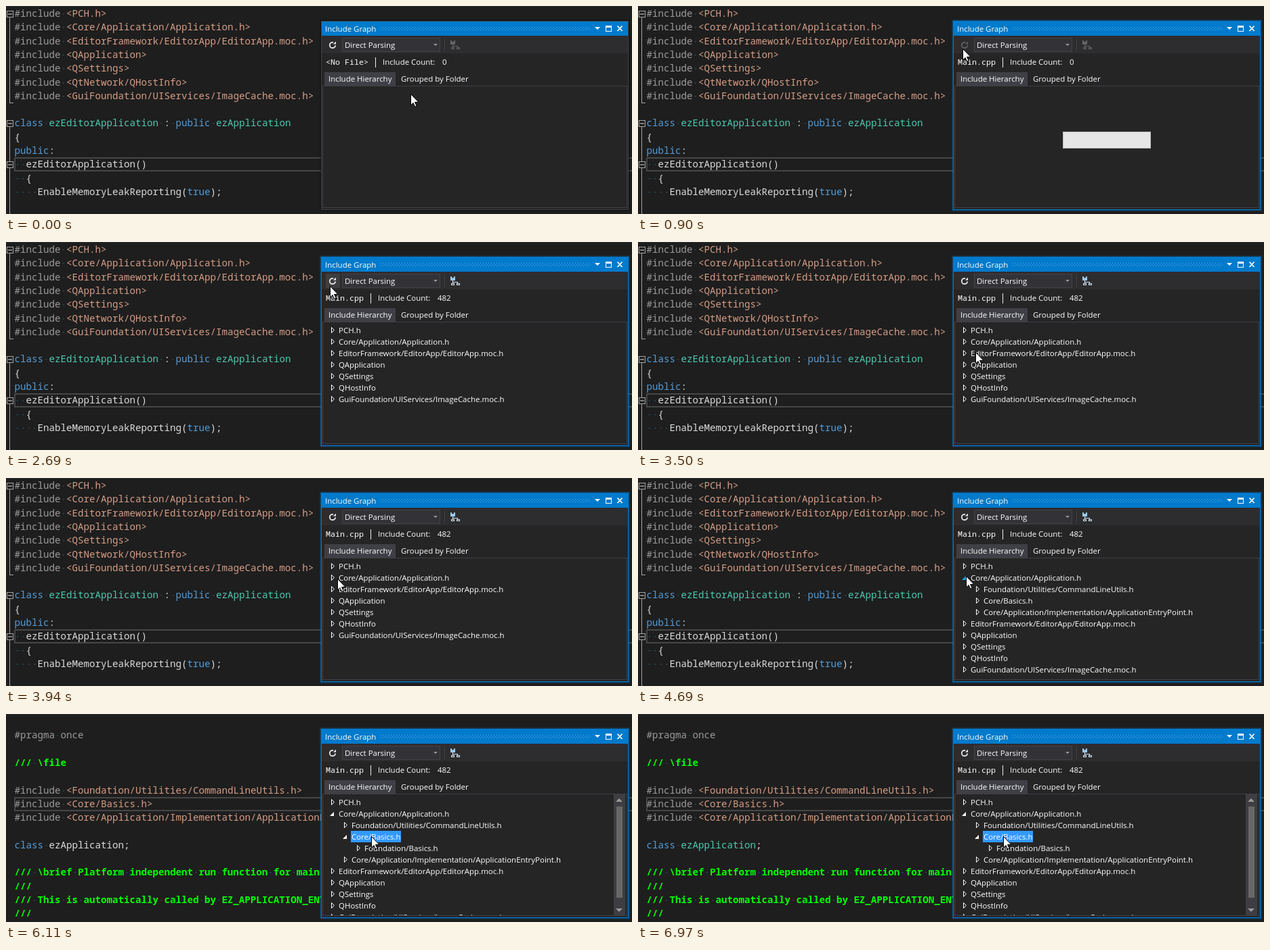
Recreate the animation shown at these times as an HTML page with a canvas. Size 924 px wide and 308 px high, loop 7200 ms.

```html
<!DOCTYPE html>
<html lang="en">
<head>
<meta charset="utf-8">
<title>Include Graph</title>
<style>
html, body { margin: 0; width: 100%; height: 100%; overflow: hidden; background: #1e1e1e; }
canvas { display: block; }
</style>
</head>
<body>
<canvas id="stage" width="924" height="308"></canvas>
<script>
const g = document.getElementById('stage').getContext('2d', { alpha: false });
const LOOP = 7200;
const UI = '11.48px "Open Sans", "Noto Sans", sans-serif';
const CODE = '14.17px "Noto Sans Mono", "DejaVu Sans Mono", monospace';
const SMALL = '11.67px "Noto Sans Mono", "DejaVu Sans Mono", monospace';
const LEFT = 12.6, CHAR = 8.5, LINE = 20.3;

const mainFile = `#include <PCH.h>
#include <Core/Application/Application.h>
#include <EditorFramework/EditorApp/EditorApp.moc.h>
#include <QApplication>
#include <QSettings>
#include <QtNetwork/QHostInfo>
#include <GuiFoundation/UIServices/ImageCache.moc.h>

class ezEditorApplication : public ezApplication
{
public:
  ezEditorApplication()
  {
    EnableMemoryLeakReporting(true);`.split('\n');

const headerFile = String.raw`
#pragma once

/// \file

#include <Foundation/Utilities/CommandLineUtils.h>
#include <Core/Basics.h>
#include <Core/Application/Implementation/ApplicationEntryPoint.h>

class ezApplication;

/// \brief Platform independent run function for main loop
///
/// This is automatically called by EZ_APPLICATION_ENTRY_POINT
///`.split('\n');

// Cursor moves: start, end, steps, control point, end point
const start = [598, 130];
const moves = [
  [80, 600, 8, 530, 35, 480, 63],
  [1110, 1110, 1, 480, 63, 479, 62],
  [2690, 3270, 9, 480, 110, 499, 162],
  [3500, 3500, 1, 499, 163, 499, 163],
  [3660, 4020, 6, 494, 152, 487, 145],
  [4160, 4160, 1, 485, 145, 485, 145],
  [4550, 4550, 1, 484, 144, 484, 144],
  [4690, 4690, 1, 485, 145, 485, 145],
  [4763, 4910, 3, 505, 165, 532, 185],
  [5220, 5440, 4, 536, 182, 540, 181]
];

// Steps done by time t out of n spread evenly from a to b
const stepsDone = (t, a, b, n) =>
  t < a ? 0 : t >= b ? n : 1 + Math.floor((t - a) / (b - a) * (n - 1));

function cursorAt(t) {
  let [x, y] = start;
  for (const [a, b, n, cx, cy, ex, ey] of moves) {
    const k = stepsDone(t, a, b, n) / n, u = k * k * (3 - 2 * k), v = 1 - u;
    x = v * v * x + 2 * u * v * cx + u * u * ex;
    y = v * v * y + 2 * u * v * cy + u * u * ey;
  }
  return [Math.round(x), Math.round(y)];
}

function rect(x, y, w, h, color) {
  g.fillStyle = color;
  g.fillRect(x, y, w, h);
}

function frame(x, y, w, h, color) {
  g.strokeStyle = color;
  g.lineWidth = 1;
  g.strokeRect(x + .5, y + .5, w - 1, h - 1);
}

function text(s, x, y, color = '#fff', font = UI) {
  g.font = font;
  g.fillStyle = color;
  g.fillText(s, x, y);
}

function shape(points, fill, stroke) {
  g.beginPath();
  for (let i = 0; i < points.length; i += 2) g.lineTo(points[i], points[i + 1]);
  g.closePath();
  if (fill) { g.fillStyle = fill; g.fill(); }
  if (stroke) { g.strokeStyle = stroke; g.lineWidth = 1; g.stroke(); }
}

// Groups: comment, directive, path, keyword, type; anything else is plain
const token = /(\/\/\/.*)|(#\w+|\bonce\b)|(<.*>)|\b(class|public|true)\b|(ezEditorApplication(?= )|ezApplication)|\w+|[^\s\w]/g;
const tokenColors = ['#00ff00', '#9b9b9b', '#d69d85', '#569cd6', '#4ec9b0'];

function codeLine(s, y, typesKnown) {
  for (const m of s.matchAll(token)) {
    const kind = m.slice(1).findIndex(Boolean);
    const plain = kind < 0 || kind === 4 && !typesKnown;
    const font = kind === 0 ? 'bold ' + CODE : CODE;
    text(m[0], LEFT + m.index * CHAR, y, plain ? '#dcdcdc' : tokenColors[kind], font);
  }
  [...s].forEach((c, i) => {
    if (c === ' ') rect(LEFT + i * CHAR + 3.5, y - 5, 1.5, 1.5, '#2a5a66');
  });
}

function foldBox(y) {
  rect(1, y, 10, 10, '#1e1e1e');
  frame(1, y, 10, 10, '#a5a5a5');
  rect(3, y + 4.5, 6, 1, '#e0e0e0');
}

function editor(t) {
  const opened = t >= 5970;
  rect(0, 0, 924, 308, '#1e1e1e');
  rect(0, 0, 924, 1, '#2d2d30');
  const rowY = opened ? 123 : 224;
  rect(12, rowY, 920, 21, '#464646');
  rect(14, rowY + 2, 920, 17, '#1e1e1e');
  (opened ? headerFile : mainFile).forEach((s, i) =>
    codeLine(s, Math.round(16 + LINE * i), !opened || t >= 6970));
  if (opened) return;
  rect(5, 12, 1, 132, '#a5a5a5');
  rect(5, 143, 6, 1, '#a5a5a5');
  rect(5, 174, 1, 134, '#a5a5a5');
  [7, 169, 230].forEach(foldBox);
}

function refreshIcon(color) {
  g.strokeStyle = color;
  g.lineWidth = 1.7;
  g.beginPath();
  g.arc(482, 58, 4.2, .1, 5);
  g.stroke();
  shape([483, 56.5, 487, 56.5, 487, 52.5], color);
}

function saveIcon(disk, nodes) {
  rect(656, 51, 7, 6, disk);
  rect(658, 51, 3, 2, '#2d2d30');
  rect(659, 57, 1, 5, nodes);
  rect(659, 59, 8, 1, nodes);
  rect(666, 59, 1, 3, nodes);
  frame(657, 61, 5, 3, nodes);
  frame(665, 61, 5, 3, nodes);
}

function titleBar() {
  rect(466, 23, 452, 21, '#007acc');
  text('Include Graph', 471, 38);
  for (let x = 552; x < 862; x += 4) {
    rect(x, 31, 1, 1, '#59a8de');
    rect(x + 2, 33, 1, 1, '#59a8de');
    rect(x, 35, 1, 1, '#59a8de');
  }
  shape([869, 31, 877, 31, 873, 35], '#fff');
  frame(885, 29, 9, 9, '#fff');
  rect(885, 29, 9, 3, '#fff');
  g.lineWidth = 1.7;
  g.strokeStyle = '#fff';
  g.beginPath();
  g.moveTo(902.5, 29.5); g.lineTo(909.5, 37);
  g.moveTo(909.5, 29.5); g.lineTo(902.5, 37);
  g.stroke();
}

function treeRows(t) {
  const open = t >= 4690, inner = t >= 5890;
  return [
    [0, 'PCH.h'],
    [0, 'Core/Application/Application.h', open],
    ...(open ? [
      [1, 'Foundation/Utilities/CommandLineUtils.h'],
      [1, 'Core/Basics.h', inner],
      ...(inner ? [[2, 'Foundation/Basics.h']] : []),
      [1, 'Core/Application/Implementation/ApplicationEntryPoint.h']
    ] : []),
    [0, 'EditorFramework/EditorApp/EditorApp.moc.h'],
    [0, 'QApplication'],
    [0, 'QSettings'],
    [0, 'QHostInfo'],
    [0, 'GuiFoundation/UIServices/ImageCache.moc.h']
  ];
}

function tree(t, [mx, my]) {
  g.save();
  g.beginPath();
  g.rect(468, 119, 448, 179);
  g.clip();
  treeRows(t).forEach(([depth, name, open], i) => {
    const x = 480 + 19 * depth, y = 131 + 17 * i;
    const hover = mx >= x - 3 && mx < x + 9 && Math.abs(my - y) < 8;
    const color = hover ? '#1ba1e2' : '#fff';
    if (open) shape([x - 2, y + 3, x + 4, y + 3, x + 4, y - 3], color);
    else shape([x + .5, y - 4.5, x + 4.5, y - .5, x + .5, y + 3.5], null, color);
    if (name === 'Core/Basics.h' && t >= 5830) rect(509, y - 9, 74, 17, '#3399ff');
    text(name, x + 11, y + 4);
  });
  g.restore();
  if (t >= 5890) {
    rect(897, 119, 17, 179, '#3e3e42');
    rect(901, 137, 9, 135, '#686868');
    shape([900, 130, 910, 130, 905, 125], '#999');
    shape([900, 288, 910, 288, 905, 293], '#999');
  }
}

function progress(t) {
  rect(627, 186, 130, 25, '#bcbcbc');
  rect(628, 187, 128, 23, '#e6e6e6');
  const k = stepsDone(t, 1110, 1770, 10);
  if (!k) return;
  const shown = t < 1770 ? 1110 + (k - 1) * 660 / 9 : [2070, 1930, 1850, 1770].find(s => t >= s);
  const right = Math.round(626 + (shown - 900) * .094);
  const left = Math.max(628, right - 32);
  rect(left, 187, right - left, 23, '#06b025');
}

function toolWindow(t, mouse) {
  const [mx, my] = mouse;
  const busy = t >= 900 && t < 2140, done = t >= 2140;
  const inToolbar = my >= 47 && my < 68;
  const active = t >= 740;
  const glow = active ? '0,122,204' : '0,0,0';
  [.2, .4].forEach((a, i) =>
    frame(463 + i, 20 + i, 458 - 2 * i, 284 - 2 * i, `rgba(${glow},${a})`));
  rect(465, 22, 454, 280, active ? '#007acc' : '#434346');
  rect(466, 23, 452, 278, '#252526');
  titleBar();
  rect(466, 44, 452, 26, '#2d2d30');

  if (inToolbar && mx >= 472 && mx < 493 && !busy) rect(472, 47, 21, 21, '#3e3e40');
  refreshIcon(busy ? '#656565' : '#f1f1f1');
  const overCombo = inToolbar && mx >= 497 && mx < 640;
  rect(496, 47, 145, 21, overCombo ? '#3f3f46' : '#333337');
  frame(496, 47, 145, 21, overCombo ? '#55555c' : '#434346');
  text('Direct Parsing', 500, 62);
  shape([631, 56, 637, 56, 634, 59], '#999');
  rect(647, 48, 1, 19, '#3f3f46');
  saveIcon(done ? '#9cc8ee' : '#656565', done ? '#d5e4ee' : '#656565');

  const shift = t >= 900 ? 7 : 0;
  text(shift ? 'Main.cpp' : '<No File>', 472, 87, '#fff', SMALL);
  rect(545 - shift, 76, 1, 15, '#f1f1f1');
  text('Include Count:', 556 - shift, 87);
  text(done ? '482' : '0', 644 - shift, 87);

  rect(470, 98, 105, 20, '#3f3f46');
  text('Include Hierarchy', 476, 112);
  text('Grouped by Folder', 583, 112);
  frame(467, 118, 450, 181, '#3f3f46');

  if (busy) progress(t);
  if (done) tree(t, mouse);
}

function tooltip(x, y, path) {
  rect(x, y, 924 - x + 2, 25, '#767676');
  rect(x + 1, y + 1, 924 - x, 23, '#f1f2f7');
  text('F:\\Development\\current_development\\ezEngine\\Trunk\\Code\\' + path, x + 7, y + 16, '#575757');
}

function cursor(x, y) {
  const arrow = [0, 0, 0, 16.5, 3.5, 13, 6.2, 18.7, 8.6, 17.6, 6, 12, 11.3, 11.8];
  shape(arrow.map((v, i) => v + (i % 2 ? y + .5 : x - .5)), '#fff', '#000');
}

function draw(t) {
  const mouse = cursorAt(t);
  editor(t);
  toolWindow(t, mouse);
  if (t >= 3660 && t < 3804) tooltip(496, 183, 'Tools\\Libs\\EditorFramework\\EditorApp\\EditorApp.moc.h');
  if (t >= 5440 && t < 5890) tooltip(537, 205, 'Engine\\Core\\Basics.h');
  cursor(...mouse);
}

const begin = performance.now();
function tick() {
  draw((performance.now() - begin) % LOOP);
  requestAnimationFrame(tick);
}
tick();
</script>
</body>
</html>
```
